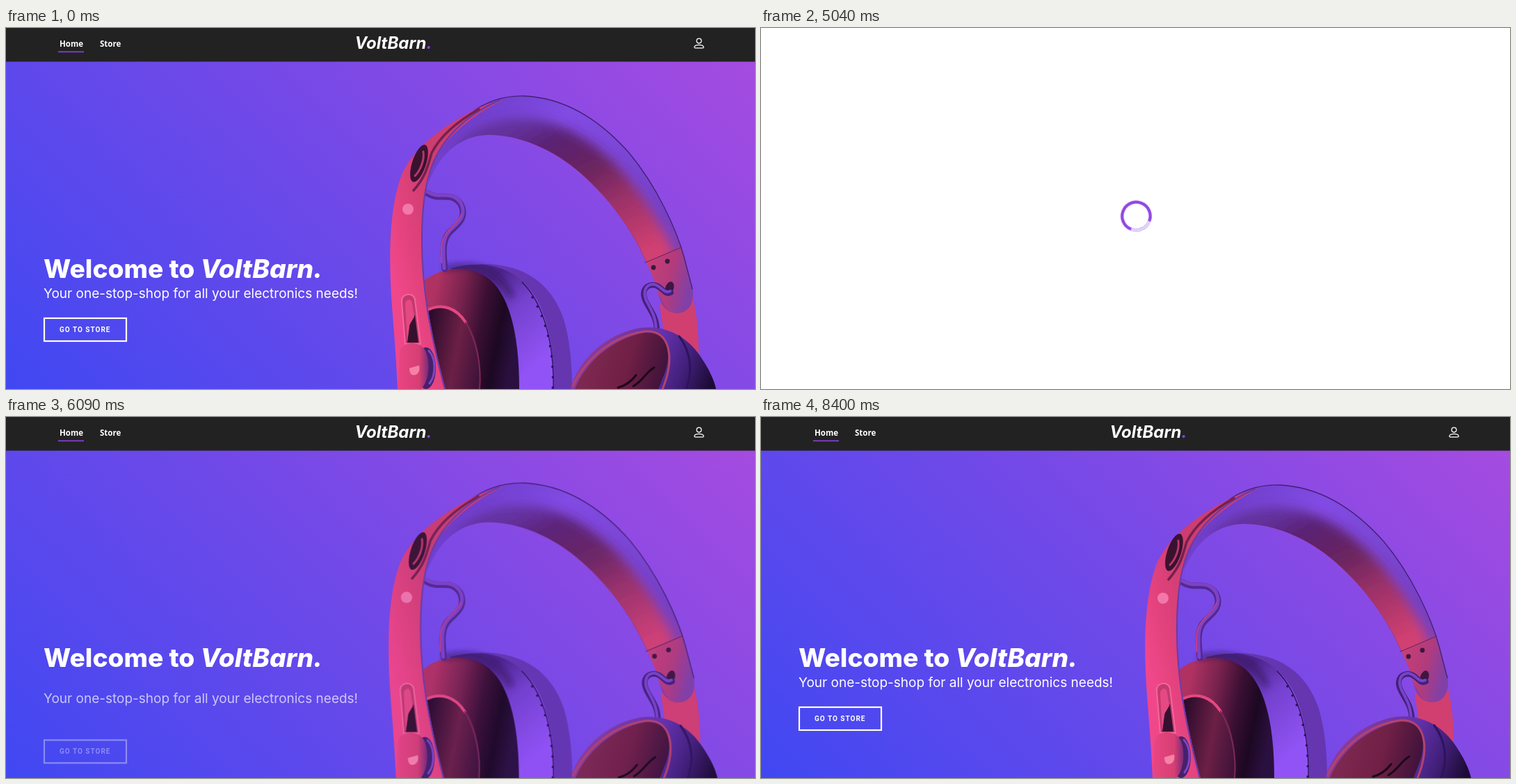
Animation of 1077x520 px, one loop 8470 ms. Source, as an HTML page:

```html
<!DOCTYPE html>
<html lang="en">
<head>
<meta charset="utf-8">
<title>Electronics store</title>
<style>
  html, body { margin: 0; width: 100%; height: 100%; overflow: hidden; background: #fff; }
  svg { display: block; }
  .head { font-family: Inter, sans-serif; fill: #fff; }
  .nav { font-family: "Open Sans", sans-serif; font-size: 11.5px; fill: #fff; }
  .links { font-weight: 700; }
  .item { font-size: 12px; }
  .anim { animation: 8470ms linear infinite; }

  .title { animation-name: title; }
  .sub { animation-name: sub; }
  .cta { animation-name: cta; }
  .photo { animation-name: photo; transform-origin: 784px 385px; }
  .icon { animation-name: icon; }
  .out { animation-name: out; }
  .in { animation-name: in; }
  .hover { animation-name: hover; }
  .loader { animation-name: loader; }
  .spin { animation-name: spin; transform-origin: 539.5px 271px; }

  @keyframes title {
    0%, 58% { opacity: 1; transform: none; }
    58.01%, 63.75% { opacity: 0; transform: translateY(75px); animation-timing-function: ease; }
    71.78%, 100% { opacity: 1; transform: none; }
  }
  @keyframes sub {
    0%, 58% { opacity: 1; transform: none; }
    58.01%, 65.63% { opacity: 0; transform: translateY(75px); animation-timing-function: ease; }
    80.93%, 100% { opacity: 1; transform: none; }
  }
  @keyframes cta {
    0%, 58% { opacity: 1; transform: none; }
    58.01%, 66.9% { opacity: 0; transform: translateY(75px); animation-timing-function: ease; }
    88.5%, 100% { opacity: 1; transform: none; }
  }
  @keyframes photo {
    0%, 58% { opacity: 1; transform: none; }
    58.01%, 64.9% { opacity: 0; transform: scale(1.2); animation-timing-function: ease; }
    74.62%, 100% { opacity: 1; transform: none; }
  }
  @keyframes icon {
    0%, 16.53%, 28.5%, 77.92%, 85%, 100% { stroke: #fff; }
    18%, 27.15%, 79.5%, 83.8% { stroke: #8a3fe0; }
  }
  @keyframes out {
    0%, 16.53% { opacity: 0; transform: translateY(20px); animation-timing-function: ease; }
    20.07%, 58% { opacity: 1; transform: none; }
    58.01%, 100% { opacity: 0; transform: translateY(20px); }
  }
  @keyframes in {
    0%, 77.92% { opacity: 0; transform: translateY(20px); animation-timing-function: ease; }
    81.46%, 85.01% { opacity: 1; transform: none; animation-timing-function: ease; }
    88.55%, 100% { opacity: 0; transform: translateY(20px); }
  }
  @keyframes hover {
    0%, 27.5% { fill: #fff; }
    29%, 58% { fill: #9a4ae6; }
    58.01%, 100% { fill: #fff; }
  }
  @keyframes loader {
    0%, 56.2% { visibility: hidden; animation-timing-function: step-end; }
    56.21%, 63.63% { visibility: visible; animation-timing-function: step-end; }
    63.64%, 100% { visibility: hidden; }
  }
  @keyframes spin {
    from { transform: rotate(51.6deg); }
    to { transform: rotate(3100.8deg); }
  }
</style>
</head>
<body>
<svg width="1077" height="520" viewBox="0 0 1077 520">
  <defs>
    <linearGradient id="bg" gradientUnits="userSpaceOnUse" x1="151.5" y1="671.5" x2="925.5" y2="-102.5">
      <stop stop-color="#4048f2"/><stop offset=".5" stop-color="#7149e8"/><stop offset="1" stop-color="#a54be0"/>
    </linearGradient>
    <linearGradient id="band" gradientUnits="userSpaceOnUse" x1="640" y1="110" x2="985" y2="400">
      <stop stop-color="#6a3bc4"/><stop offset=".3" stop-color="#824be4"/><stop offset=".75" stop-color="#7541c6"/><stop offset="1" stop-color="#8c3c9c"/>
    </linearGradient>
    <linearGradient id="under" gradientUnits="userSpaceOnUse" x1="770" y1="130" x2="880" y2="345">
      <stop stop-color="#63309c"/><stop offset=".15" stop-color="#5a2272"/><stop offset=".4" stop-color="#6a2560"/><stop offset=".65" stop-color="#9c3168"/><stop offset="1" stop-color="#d24072"/>
    </linearGradient>
    <linearGradient id="tip" x2="1" y2=".3">
      <stop stop-color="#cc4074"/><stop offset=".6" stop-color="#b23b7c"/><stop offset="1" stop-color="#8040a8"/>
    </linearGradient>
    <linearGradient id="strip" gradientUnits="userSpaceOnUse" x1="550" y1="330" x2="632" y2="310">
      <stop stop-color="#f0478b"/><stop offset=".35" stop-color="#e4437e"/><stop offset="1" stop-color="#cd3d70"/>
    </linearGradient>
    <linearGradient id="shell" gradientUnits="userSpaceOnUse" x1="700" y1="360" x2="790" y2="460">
      <stop stop-color="#4b2488"/><stop offset=".4" stop-color="#7541cf"/><stop offset="1" stop-color="#9153f5"/>
    </linearGradient>
    <linearGradient id="pad" gradientUnits="userSpaceOnUse" x1="612" y1="400" x2="738" y2="425">
      <stop stop-color="#b03262"/><stop offset=".3" stop-color="#7a234f"/><stop offset=".58" stop-color="#3a0f33"/><stop offset=".8" stop-color="#1c0822"/><stop offset="1" stop-color="#2a103f"/>
    </linearGradient>
    <linearGradient id="well" gradientUnits="userSpaceOnUse" x1="605" y1="450" x2="685" y2="465">
      <stop stop-color="#2c0c2c"/><stop offset=".55" stop-color="#6c2046"/><stop offset="1" stop-color="#42133a"/>
    </linearGradient>
    <linearGradient id="cup" gradientUnits="userSpaceOnUse" x1="850" y1="440" x2="1015" y2="510">
      <stop stop-color="#8a3b9c"/><stop offset=".5" stop-color="#6231aa"/><stop offset=".75" stop-color="#43207c"/><stop offset="1" stop-color="#1c0b34"/>
    </linearGradient>
    <linearGradient id="face" gradientUnits="userSpaceOnUse" x1="840" y1="470" x2="950" y2="500">
      <stop stop-color="#7d2850"/><stop offset=".5" stop-color="#701f45"/><stop offset="1" stop-color="#3c123a"/>
    </linearGradient>
    <linearGradient id="knob" x2="1">
      <stop stop-color="#ea4583"/><stop offset=".7" stop-color="#d63f73"/><stop offset="1" stop-color="#7b2a78"/>
    </linearGradient>
    <filter id="soft" x="-20%" y="-20%" width="140%" height="140%"><feGaussianBlur stdDeviation="8"/></filter>
    <filter id="shade" x="-20%" y="-40%" width="140%" height="180%"><feGaussianBlur stdDeviation="4"/></filter>
    <path id="arc" d="M608 222C612 180 636 148 666 124C692 104 720 97 746 98C808 101 858 137 896 180C936 228 964 290 975 330L987 376C991 402 976 414 958 410C946 406 941 396 938 383C934 366 928 352 920 336C900 290 868 246 826 209C786 174 736 153 692 154C654 155 624 181 608 222Z"/>
    <clipPath id="arcClip"><use href="#arc"/></clipPath>
  </defs>

  <rect y="48" width="1077" height="472" fill="url(#bg)"/>

  <g class="anim photo" fill="none" stroke-linecap="round">
    <!-- right arm and headband -->
    <path d="M940 398L986 385C994 412 996 440 996 472L946 440Z" fill="#d13f70"/>
    <use href="#arc" fill="url(#band)"/>
    <g clip-path="url(#arcClip)">
      <path d="M640 178C664 146 700 130 745 130C800 132 852 166 894 216C930 262 950 298 962 330L925 360L790 220L690 175Z" fill="url(#under)" filter="url(#soft)"/>
      <path d="M919 338L971 315L990 376C992 408 970 416 952 408L936 380Z" fill="url(#tip)"/>
      <path d="M692 155C736 154 786 175 826 210C868 247 900 291 920 337" stroke="#a8336d" stroke-width="2"/>
    </g>
    <path d="M666 124C692 104 720 97 746 98C808 101 858 137 896 180C936 228 964 290 975 330L987 376" stroke="#43206f" stroke-width="1.3"/>
    <path d="M919 338L971 316" stroke="#632459"/>
    <g fill="#3d173f"><circle cx="931" cy="345" r="3.4"/><circle cx="951" cy="336" r="3.4"/><ellipse cx="954" cy="375" rx="6" ry="10" transform="rotate(18 954 375)"/></g>
    <path d="M956 381C946 386 943 370 930 370C917 371 914 382 920 394C928 410 935 415 936 435" stroke="#43207b" stroke-width="8"/>
    <path d="M955 379C945 384 941 369 930 369C918 370 916 382 921 393C929 409 934 415 935 435" stroke="#7842c9" stroke-width="4"/>

    <!-- left ear cup -->
    <path d="M680 340C742 338 784 366 802 420C811 450 814 485 814 520H690Z" fill="#6536b0"/>
    <path d="M640 346C700 330 746 352 768 400C784 438 788 480 787 520H660Z" fill="url(#shell)"/>
    <path d="M742 366C776 400 788 460 787 520" stroke="#2a1053" stroke-width="1.2"/>
    <path d="M757 388C779 425 788 470 786 520" stroke="#2a1053" stroke-width="3.4" stroke-dasharray="0 15"/>
    <path d="M600 365C622 345 662 340 690 358C722 380 738 435 738 520H600Z" fill="url(#pad)"/>
    <path d="M632 346C680 336 708 350 726 385" stroke="#341459" stroke-width="5" filter="url(#shade)"/>
    <path d="M602 407C628 394 652 404 667 430C680 454 684 490 681 520H602Z" fill="url(#well)"/>
    <path d="M604 407C628 395 648 404 661 424" stroke="#e3487f" stroke-width="4"/>
    <path d="M661 424C677 450 684 488 681 520" stroke="#7c2856" stroke-width="2"/>

    <path d="M606 238C624 250 640 234 654 254C664 274 648 284 638 294C626 306 629 327 631 347" stroke="#532891" stroke-width="9"/>
    <path d="M606 236C624 248 640 232 654 252C664 272 648 282 638 292C626 304 629 325 630 346" stroke="#7d42c5" stroke-width="5"/>
    <path d="M655 268C650 284 626 292 626 318V338" stroke="#ba3f8d" stroke-width="2"/>

    <!-- left arm -->
    <path d="M563 520C561 470 557 430 554 386C550 315 553 256 568 214C582 178 620 146 668 121C688 110 704 106 716 103C680 120 642 148 622 180C604 212 599 256 599 306C599 374 610 436 632 520Z" fill="url(#strip)"/>
    <path d="M710 104C674 119 640 146 621 180C603 212 598 256 598 306C598 374 609 436 631 520" stroke="#673aa9" stroke-width="2"/>
    <path d="M680 117C650 134 624 156 612 180C606 202 602 216 586 234" stroke="#75204e" stroke-width="3.5"/>
    <ellipse cx="594" cy="195" rx="10" ry="28" transform="rotate(18 594 195)" fill="#3a1230"/>
    <path d="M600 178C602 190 596 205 588 213" stroke="#b6366a" stroke-width="3"/>
    <circle cx="578" cy="261" r="8" fill="#f277aa"/>
    <path d="M569 394C568 382 586 380 588 391L596 455H574Z" fill="#c33a6d" stroke="#f4669c" stroke-width="2"/>
    <path d="M582 416L588 414L593 453H577Z" fill="#35112f"/>
    <path d="M574 399C574 390 583 388 584 397L587 416L580 428L577 451Z" fill="#e54983"/>
    <ellipse cx="604" cy="490" rx="14" ry="30" fill="#45206d"/>
    <path d="M608 465C618 475 619 499 609 512" stroke="#8146c4" stroke-width="3"/>
    <path d="M566 466C570 450 597 450 604 467C611 485 607 510 597 520H563Z" fill="url(#knob)"/>
    <path d="M580 490L594 486C596 494 592 500 586 500C582 500 580 496 580 490Z" fill="#f681a6"/>

    <!-- right ear cup -->
    <path d="M812 520C821 480 862 440 912 432C954 427 985 449 1003 480C1012 494 1018 507 1021 520Z" fill="url(#cup)"/>
    <path d="M818 520C833 482 872 447 918 439C954 436 958 472 946 500L938 520Z" fill="url(#face)"/>
    <path d="M815 515C835 475 872 444 918 437C956 434 962 476 944 520" stroke="#b3436c" stroke-width="3"/>
    <path d="M968 444C986 468 987 496 978 520" stroke="#2e135c" stroke-width="3"/>
    <path d="M932 489C920 496 916 508 902 516M880 518C892 515 900 508 906 500" stroke="#1c0819" stroke-width="3"/>
  </g>

  <g class="head">
    <text class="anim title" x="54" y="360" font-size="37.2" font-weight="800">Welcome to <tspan font-style="italic">VoltBarn.</tspan></text>
    <text class="anim sub" x="54" y="389" font-size="19">Your one-stop-shop for all your electronics needs!</text>
    <g class="anim cta">
      <rect x="55" y="418" width="118" height="33" fill="none" stroke="#fff" stroke-width="2.2"/>
      <text x="77" y="437.5" style="font: 700 10px Roboto, sans-serif; letter-spacing: 1px">GO TO STORE</text>
    </g>
  </g>

  <rect width="1077" height="48.5" fill="#222"/>
  <g class="nav links">
    <text x="77" y="27">Home</text>
    <text x="135" y="27">Store</text>
  </g>
  <rect x="75" y="33.5" width="37" height="1.7" fill="#8a3fe0"/>
  <text class="head" x="557" y="30" text-anchor="middle" font-size="24" font-weight="700" font-style="italic">VoltBarn<tspan fill="#8a3fe0">.</tspan></text>
  <g class="anim icon" fill="none" stroke="#fff" stroke-width="1.3">
    <circle cx="996.5" cy="18.6" r="3.4"/>
    <path d="M991.4 28.8H1001.6Q1003.6 28.8 1003 27C1001.8 23.6 991.2 23.6 990 27Q989.4 28.8 991.4 28.8Z"/>
  </g>

  <g class="anim out nav">
    <rect x="877" y="37" width="150" height="49" opacity=".4" fill="#000" filter="url(#shade)"/>
    <rect x="877" y="37" width="150" height="49" fill="#222"/>
    <text class="item anim hover" x="892" y="66">Logout</text>
  </g>
  <g class="anim in nav">
    <rect x="877" y="37" width="150" height="76" opacity=".4" fill="#000" filter="url(#shade)"/>
    <rect x="877" y="37" width="150" height="76" fill="#222"/>
    <text class="item" x="892" y="66">Login</text>
    <text class="item" x="892" y="92">Register</text>
  </g>

  <g class="anim loader">
    <rect width="1077" height="520" fill="#fff"/>
    <g class="anim spin" fill="none" stroke-width="4.5">
      <circle cx="539.5" cy="271" r="20.2" stroke="#9147e2"/>
      <path d="M553.8 256.7A20.2 20.2 0 0 1 553.8 285.3" stroke="#dfd3fb"/>
    </g>
  </g>
</svg>
</body>
</html>
```
